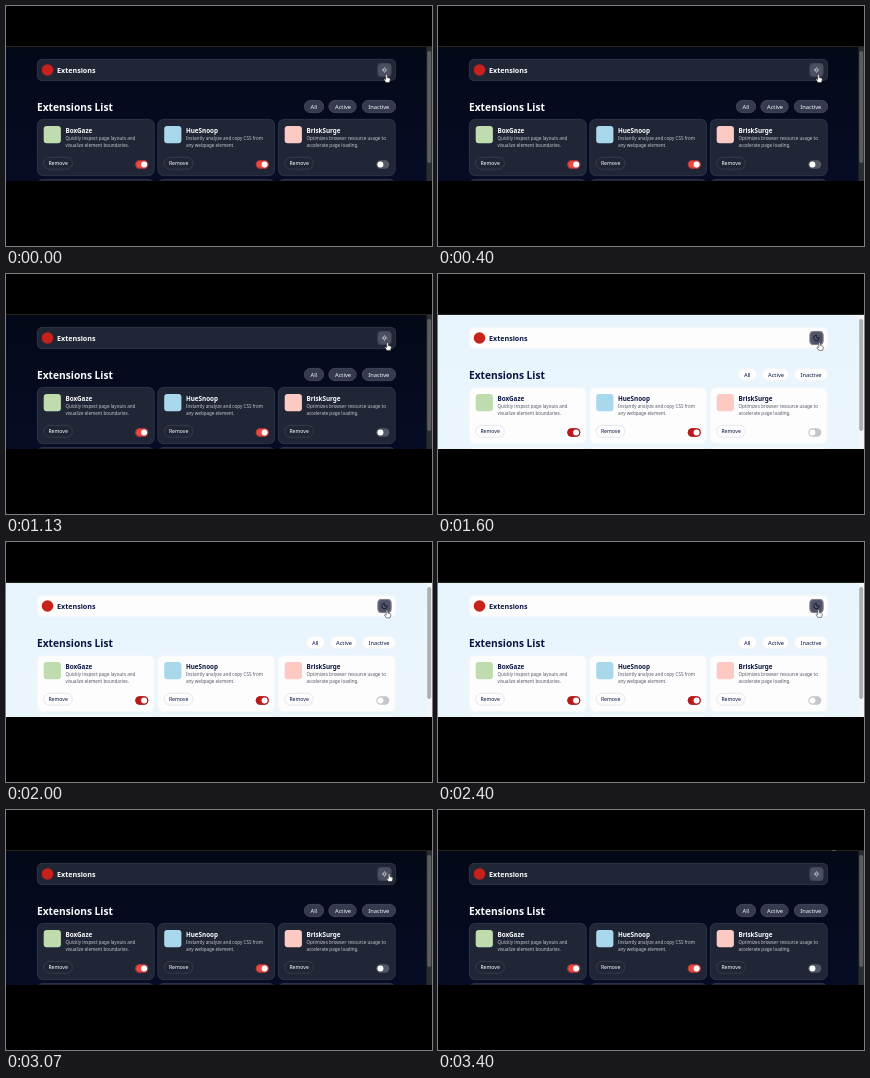
An HTML page with a canvas that plays this animation: 426x240 px, repeating every 3470 ms.

```html
<!DOCTYPE html>
<html lang="en">
<head>
<meta charset="utf-8">
<title>Extensions list</title>
<style>
html, body { margin: 0; width: 100%; height: 100%; overflow: hidden; background: #000; }
canvas { display: block; width: 426px; height: 240px; }
</style>
</head>
<body>
<canvas id="stage" width="426" height="240"></canvas>
<script>
const ctx = document.getElementById('stage').getContext('2d');
const LOOP = 3470, LIGHT_FROM = 1370, LIGHT_TO = 2570;
const FONT = '"Noto Sans", "Open Sans", sans-serif';

const dark = {
  page: ['#040918', '#060c24'], panel: '#212636', border: '#32384e',
  text: '#fbfdfe', muted: '#c6c8ce', pill: '#353a4e', pillBorder: '#43485b',
  remove: '#212636', removeBorder: '#3f4458', on: '#f0473f', onRing: '#8c3038', off: '#545969',
  button: '#4b4f60', buttonRing: '#3b4052', icon: '#ffffff', logo: '#c7211d',
  track: '#2b2c2e', thumb: '#5c5d5c',
  pills: [['All', 298, 20, 304.5], ['Active', 322.5, 28, 329], ['Inactive', 356, 34, 362.3]]
};
const light = {
  page: ['#e8f4fd', '#ebf6fc'], panel: '#fdfdfe', border: '#eef3f8',
  text: '#091540', muted: '#545969', pill: '#fdfdfe', pillBorder: '#eceff4',
  remove: '#fdfdfe', removeBorder: '#dcdfe5', on: '#bd1a1c', onRing: '#a3161c', off: '#c4c5c8',
  button: '#505468', buttonRing: '#a39ea3', icon: '#15192f', logo: '#c7231a',
  track: '#f4f5f6', thumb: '#aeafb1',
  pills: [['All', 300, 19, 306], ['Active', 324, 27, 330], ['Inactive', 356, 34, 362.5]]
};

const cards = [
  { x: 31, tile: '#bedcae', name: 'BoxGaze', on: true,
    lines: ['Quickly inspect page layouts and', 'visualize element boundaries.'] },
  { x: 151.5, tile: '#a9d8ec', name: 'HueSnoop', on: true,
    lines: ['Instantly analyze and copy CSS from', 'any webpage element.'] },
  { x: 272, tile: '#fccac3', name: 'BriskSurge', on: false,
    lines: ['Optimizes browser resource usage to', 'accelerate page loading.'] }
];

// time, x, y of the pointer's fingertip
const pointerPath = [
  [0, 380.5, 69], [400, 380.5, 69], [1130, 381.5, 69], [1600, 381.5, 69],
  [2400, 380.5, 68], [2730, 381.5, 67.5], [3000, 382, 67], [3400, 395, 33], [LOOP, 396, 28]
];

function box(x, y, w, h, r, fill, stroke) {
  ctx.beginPath();
  ctx.roundRect(x, y, w, h, r);
  ctx.fillStyle = fill;
  ctx.fill();
  if (stroke) {
    ctx.beginPath();
    ctx.roundRect(x + .35, y + .35, w - .7, h - .7, r);
    ctx.strokeStyle = stroke;
    ctx.lineWidth = .7;
    ctx.stroke();
  }
}

function disc(x, y, r, fill) {
  ctx.beginPath();
  ctx.arc(x, y, r, 0, Math.PI * 2);
  ctx.fillStyle = fill;
  ctx.fill();
}

function label(str, x, y, size, weight, color) {
  ctx.font = `${weight} ${size}px ${FONT}`;
  ctx.fillStyle = color;
  ctx.fillText(str, x, y);
}

function drawSun(x, y, color) {
  ctx.strokeStyle = color;
  ctx.lineWidth = .6;
  ctx.beginPath();
  ctx.arc(x, y, 1.3, 0, Math.PI * 2);
  for (let i = 0; i < 8; i++) {
    const c = Math.cos(i * Math.PI / 4), s = Math.sin(i * Math.PI / 4);
    ctx.moveTo(x + c * 2.1, y + s * 2.1);
    ctx.lineTo(x + c * 2.8, y + s * 2.8);
  }
  ctx.stroke();
}

function drawMoon(x, y, color) {
  ctx.beginPath();
  ctx.arc(x, y, 2.8, -.2, Math.PI * 1.5);
  ctx.quadraticCurveTo(x - 1, y + 1.2, x + 2.7, y - .5);
  ctx.strokeStyle = color;
  ctx.lineWidth = .9;
  ctx.stroke();
}

function drawHeader(theme) {
  box(31, 53, 359, 22, 5, theme.panel, theme.border);
  disc(41.5, 64, 5.8, theme.logo);
  label('Extensions', 51, 66.8, 7.15, 600, theme.text);
  box(371.5, 57, 14, 14, 4, theme.button, theme.buttonRing);
  (theme === dark ? drawSun : drawMoon)(378.5, 64, theme.icon);
}

function drawToggle(x, on, theme) {
  box(x, 154.3, 13, 8.4, 4.2, on ? theme.on : theme.off, on ? theme.onRing : null);
  disc(on ? x + 8.8 : x + 4.1, 158.5, 3, '#fff');
}

function drawCard(card, theme) {
  const { x } = card;
  box(x, 113, 117.5, 57, 6, theme.panel, theme.border);
  box(x + 6.7, 120, 17.2, 17.2, 3, card.tile);
  label(card.name, x + 28.4, 126.9, 6.3, 600, theme.text);
  card.lines.forEach((line, i) => label(line, x + 28.4, 134.3 + i * 6.3, 4.55, 400, theme.muted));
  box(x + 6.3, 151, 29.5, 12.5, 6.2, theme.remove, theme.removeBorder);
  label('Remove', x + 11.4, 159, 5.15, 500, theme.text);
  drawToggle(x + 98.3, card.on, theme);
  box(x, 173, 117.5, 57, 6, theme.panel, theme.border);
}

function drawPage(theme) {
  const fill = ctx.createLinearGradient(0, 40, 0, 175);
  theme.page.forEach((color, i) => fill.addColorStop(i, color));
  ctx.fillStyle = fill;
  ctx.fillRect(0, 40, 426, 135);
  ctx.fillStyle = '#24261e';
  ctx.fillRect(0, 40, 426, 1);
  drawHeader(theme);
  label('Extensions List', 31, 104.6, 10.2, 600, theme.text);
  for (const [str, x, w, textX] of theme.pills) {
    box(x, 94, w, 13, 6.5, theme.pill, theme.pillBorder);
    label(str, textX, 102.7, 5.7, 400, theme.text);
  }
  cards.forEach(card => drawCard(card, theme));
  ctx.fillStyle = theme.track;
  ctx.fillRect(420.5, 41, 5.5, 134);
  box(421.2, 45, 4, 112, 2, theme.thumb);
}

function pointerAt(t) {
  const i = pointerPath.findIndex(p => p[0] > t);
  const [t0, x0, y0] = pointerPath[i - 1], [t1, x1, y1] = pointerPath[i];
  const k = (t - t0) / (t1 - t0), ease = k * k * (3 - 2 * k);
  return [x0 + (x1 - x0) * ease, y0 + (y1 - y0) * ease];
}

function drawPointer(x, y) {
  ctx.save();
  ctx.translate(x, y);
  ctx.beginPath();
  ctx.moveTo(-.8, 0);
  ctx.quadraticCurveTo(0, -.9, .8, 0);
  ctx.lineTo(.8, 2.6);
  ctx.lineTo(3.2, 3.2);
  ctx.quadraticCurveTo(4, 3.5, 3.8, 4.6);
  ctx.lineTo(3, 7.4);
  ctx.lineTo(-.6, 7.4);
  ctx.lineTo(-2.6, 4.6);
  ctx.quadraticCurveTo(-2.4, 3.6, -.8, 4.6);
  ctx.closePath();
  ctx.fillStyle = '#fff';
  ctx.strokeStyle = '#2a2622';
  ctx.lineWidth = .55;
  ctx.fill();
  ctx.stroke();
  ctx.restore();
}

function render() {
  const t = performance.now() % LOOP;
  ctx.fillStyle = '#000';
  ctx.fillRect(0, 0, 426, 240);
  ctx.save();
  ctx.beginPath();
  ctx.rect(0, 40, 426, 135);
  ctx.clip();
  drawPage(t >= LIGHT_FROM && t < LIGHT_TO ? light : dark);
  drawPointer(...pointerAt(t));
  ctx.restore();
  requestAnimationFrame(render);
}
render();
</script>
</body>
</html>
```
